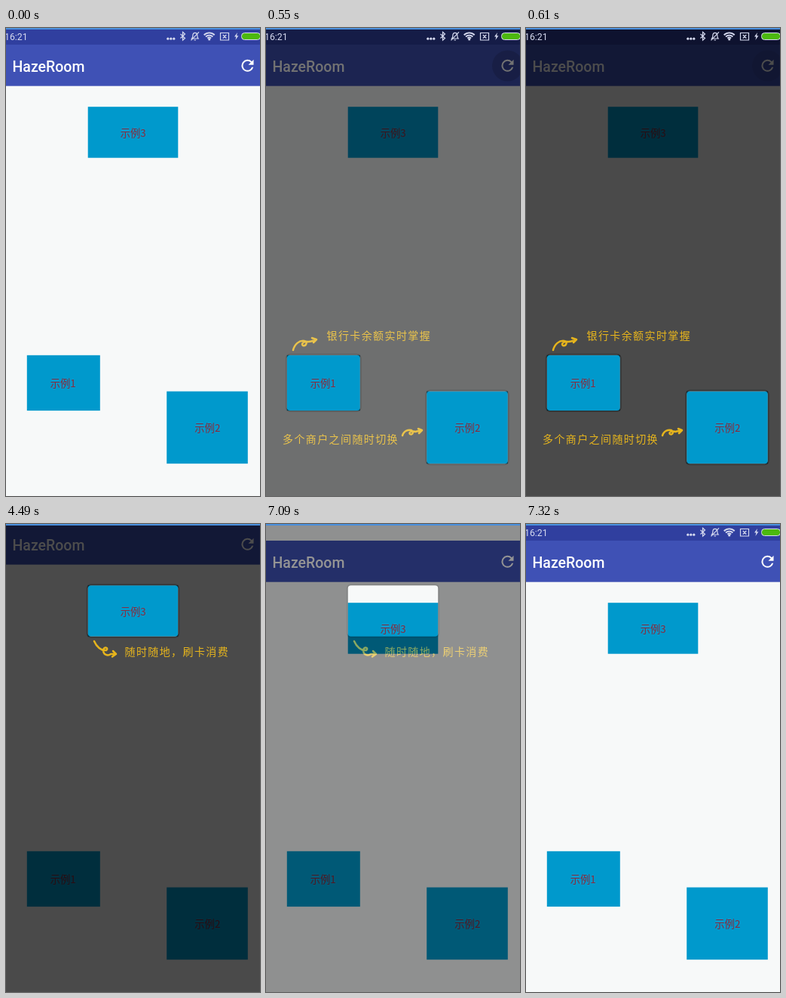
Recreate the animation shown at these times as an HTML page. Size 337 by 619 pixels, loop 8000 ms.

```html
<!DOCTYPE html>
<html lang="zh-CN">
<head>
<meta charset="utf-8">
<title>Guide overlay</title>
<style>
html, body { margin: 0; width: 100%; height: 100%; overflow: hidden; background: #f7f9f9; }
svg { display: block; position: absolute; left: 0; top: 0; width: 100vw; height: 100vh; }

.title { font: 500 19.5px Roboto, sans-serif; fill: #fff; }
.clock { font: 12.3px Roboto, sans-serif; fill: #d6daef; }
.label { font: 500 13.3px "Noto Sans CJK SC", "Noto Sans CJK", sans-serif; fill: #8c2a3c; text-anchor: middle; }
.hint  { font: 500 14px "Noto Sans CJK SC", "Noto Sans CJK", sans-serif; letter-spacing: 1.4px; fill: #e6b41c; }
.box   { fill: #0099cc; }
.arrow { fill: none; stroke: #e6b41c; stroke-width: 2.5; stroke-linecap: round; stroke-linejoin: round; }
.dim   { fill: #000; fill-opacity: .7; fill-rule: evenodd; }
.rim   { fill: none; stroke: #000; stroke-opacity: .25; stroke-width: 2; }
.line  { fill: none; stroke: #d6daef; stroke-width: 1.2; }

.top, .bar, .mask, .one, .two, .ripple { animation: 8s step-end infinite; }
.top  { animation-name: lift; }
.bar  { animation-name: bar; }
.mask { animation-name: fade; }
.one  { animation-name: first; }
.two  { animation-name: second; }
.ripple { animation-name: ripple; }

@keyframes fade {
  0% { opacity: 0; }
  6.25% { opacity: .2; }
  6.875% { opacity: .79; }
  7.625% { opacity: 1; }
  88.625% { opacity: .6; }
  89.375% { opacity: .38; }
  90.0625% { opacity: .18; }
  90.75% { opacity: .05; }
  91.5%, 100% { opacity: 0; }
}
@keyframes bar {
  0% { opacity: 1; }
  8.375% { opacity: .5; }
  9% { opacity: 0; }
  90.0625% { opacity: .4; }
  90.75% { opacity: .8; }
  91.5%, 100% { opacity: 1; }
}
@keyframes lift {
  0% { transform: translateY(0); }
  9.75% { transform: translateY(-23px); }
  88.625%, 100% { transform: translateY(0); }
}
@keyframes first {
  0% { visibility: visible; }
  56.125%, 100% { visibility: hidden; }
}
@keyframes second {
  0% { visibility: hidden; }
  56.125%, 100% { visibility: visible; }
}
@keyframes ripple {
  0% { opacity: 0; }
  6.875% { opacity: .14; }
  7.625% { opacity: .07; }
  8.375%, 100% { opacity: 0; }
}
</style>
</head>
<body>
<svg viewBox="0 0 337 619" preserveAspectRatio="none">
  <rect width="337" height="619" fill="#f7f9f9"/>

  <!-- page -->
  <g class="top">
    <rect y="22" width="337" height="54.7" fill="#3f51b5"/>
    <circle class="ripple" cx="320.5" cy="50" r="20.5"/>
    <text class="title" x="8.5" y="57.5">HazeRoom</text>
    <path transform="translate(308.5 37.8)" fill="#fff" d="M17.65 6.35A8 8 0 1 0 19.73 14h-2.08A6 6 0 1 1 16.22 7.78L13 11h7V4z"/>
    <rect class="box" x="108.7" y="104.2" width="119.6" height="67.5"/>
    <text class="label" x="168.7" y="143.5">示例3</text>
  </g>
  <rect class="box" x="27.8" y="432.8" width="97" height="73.3"/>
  <text class="label" x="75.7" y="475">示例1</text>
  <rect class="box" x="213.2" y="480.6" width="107.6" height="95.6"/>
  <text class="label" x="267.3" y="534">示例2</text>
  <rect class="bar" width="337" height="22" fill="#303f9f"/>

  <!-- overlay -->
  <g class="mask">
    <g class="one">
      <path class="dim" d="M0 0H337V619H0z
        M31.8 432.8h89a4 4 0 0 1 4 4v65.3a4 4 0 0 1-4 4h-89a4 4 0 0 1-4-4v-65.3a4 4 0 0 1 4-4z
        M217.2 480.6h99.6a4 4 0 0 1 4 4v87.6a4 4 0 0 1-4 4h-99.6a4 4 0 0 1-4-4v-87.6a4 4 0 0 1 4-4z"/>
      <rect class="rim" x="26.8" y="431.8" width="99" height="75.3" rx="5"/>
      <rect class="rim" x="212.2" y="479.6" width="109.6" height="97.6" rx="5"/>
      <text class="hint" x="80.5" y="412.3">银行卡余额实时掌握</text>
      <path class="arrow" d="M36 426C38 418 44 413 51 414C56 415 53 421 49 420C46 418 50 414 56 415C60 415 64 413 67 412M61 410L67 412L63 416"/>
      <text class="hint" x="22" y="548.5">多个商户之间随时切换</text>
      <path class="arrow" d="M181 539C183 533 188 531 193 532C197 534 194 539 191 537C189 535 193 532 198 534L206 532M202 530L207 532L203 536"/>
    </g>
    <g class="two">
      <path class="dim" d="M0 0H337V619H0z
        M112.7 81.2h111.6a4 4 0 0 1 4 4v59.5a4 4 0 0 1-4 4h-111.6a4 4 0 0 1-4-4v-59.5a4 4 0 0 1 4-4z"/>
      <rect class="rim" x="107.7" y="80.2" width="121.6" height="69.5" rx="5"/>
      <text class="hint" x="157.5" y="174.3">随时随地，刷卡消费</text>
      <path class="arrow" d="M117 155C120 162 126 168 133 167C137 164 130 161 129 167C129 173 135 175 139 172L146 172M142 168L146 172L141 175.5"/>
    </g>
  </g>

  <!-- status icons -->
  <g class="bar">
    <text class="clock" x="-2" y="15.8">16:21</text>
    <g fill="#d6daef">
      <circle cx="214.8" cy="14.2" r="1.6"/>
      <circle cx="218.8" cy="14.2" r="1.6"/>
      <circle cx="222.8" cy="14.2" r="1.6"/>
      <path d="M307 6l-4 5.5h2.4l-1 4.5 4-5.7h-2.4z"/>
      <circle cx="269.7" cy="15" r="1.6"/>
    </g>
    <path class="line" d="M231.5 8l6 5.5-3 2.7V5.3l3 2.7-6 5.5"/>
    <path class="line" d="M246.5 14h8.5c-1.6-1.6-1-4-1.3-5.5a3 3 0 0 0-5.7 0c-.3 2 .2 4-1.5 5.5zM249.5 16h2.5M245.5 16.3L256 5.3"/>
    <path class="line" style="stroke-width: 1.9" d="M262.7 9.2a10 10 0 0 1 14 0M265 11.5a6.8 6.8 0 0 1 9.4 0M267.3 13.6a3.6 3.6 0 0 1 4.8 0"/>
    <path class="line" d="M284.5 6.5h11v9.5h-11zM287.8 9l4.5 4.5M292.3 9l-4.5 4.5"/>
    <rect x="312.5" y="6.5" width="25" height="9" rx="4" fill="#4cb80f" stroke="#d6daef"/>
  </g>

  <rect width="337" height="2" fill="#4a8fdc"/>
</svg>
</body>
</html>
```
